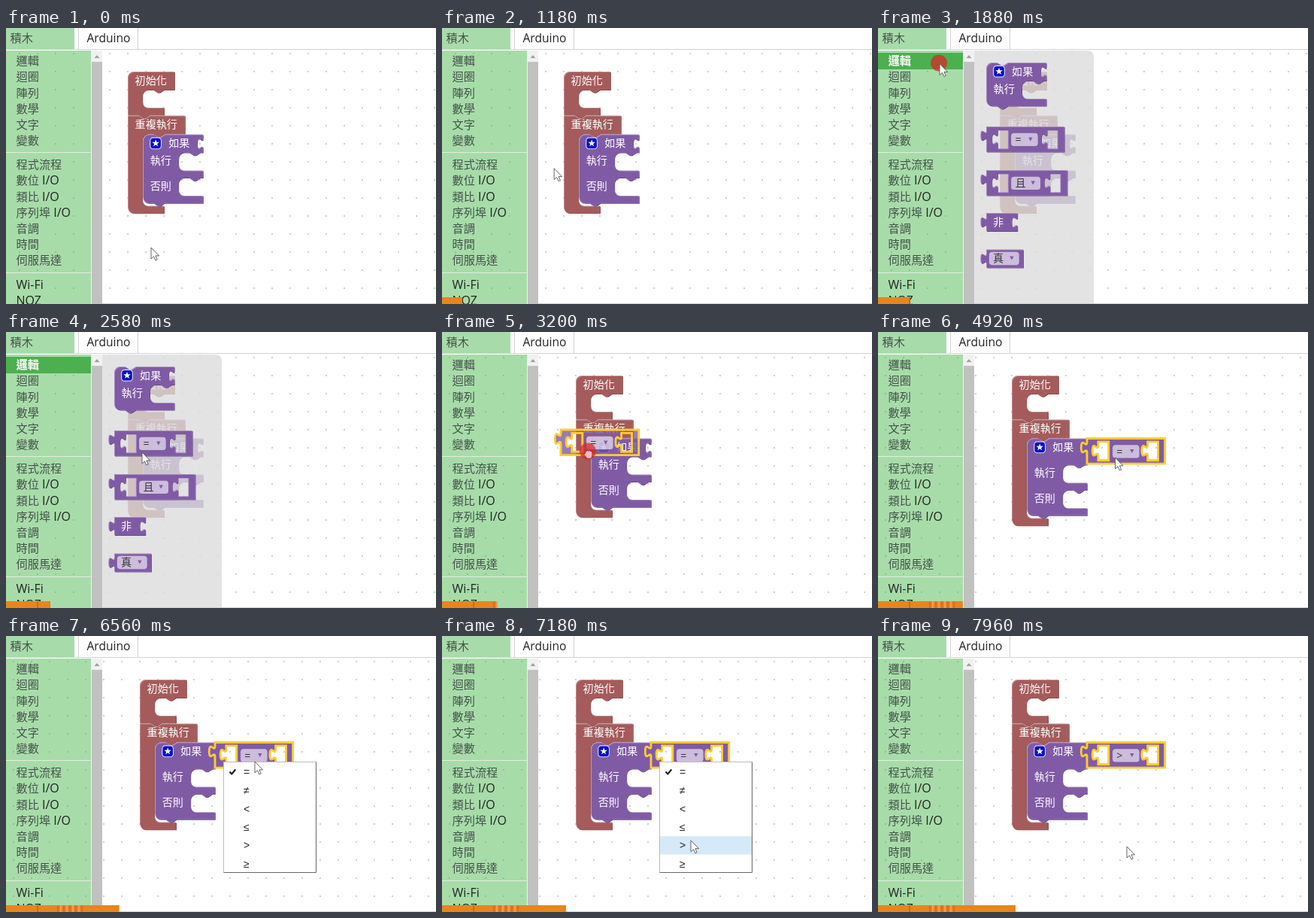
Write an HTML page that moves like this. It is 572x367 px and loops after 8 s.

```html
<!DOCTYPE html>
<html lang="zh-Hant">
<head>
<meta charset="utf-8">
<title>Blocks</title>
<style>
html, body { margin: 0; width: 100%; height: 100%; overflow: hidden; background: #fff; }
svg { display: block; }
text { font-family: "Open Sans", "Noto Sans CJK TC", "Noto Sans CJK JP", sans-serif; white-space: pre; }
.menu text { font: 14px "Liberation Sans", sans-serif; fill: #222; }
</style>
</head>
<body>
<script>
const NS = 'http://www.w3.org/2000/svg';
const LOOP = 8000, STEP = 78, SCALE = 0.96;
const RED = { face: '#a55b5b', dark: '#844949', light: '#c08c8c' };
const PURPLE = { face: '#805ba5', dark: '#664984', light: '#a68cc0' };
const GOLD = '#fc3', INK = '#222', SOFT = '#44524a';

function el(tag, attrs, parent) {
  const node = document.createElementNS(NS, tag);
  for (const k in attrs) node.setAttribute(k, attrs[k]);
  if (parent) parent.appendChild(node);
  return node;
}
const set = (node, attrs) => { for (const k in attrs) node.setAttribute(k, attrs[k]); };
const show = (node, on) => node.setAttribute('visibility', on ? 'inherit' : 'hidden');
const rect = (parent, x, y, width, height, fill, more) =>
  el('rect', { x, y, width, height, fill, ...more }, parent);
const group = (parent, attrs) => el('g', attrs || {}, parent);
function text(parent, x, y, str, size, fill, more) {
  const t = el('text', { x, y, 'font-size': size, fill, ...more }, parent);
  t.textContent = str;
  return t;
}
const at = (x, y) => `translate(${x} ${y})`;
const scaled = (x, y) => `${at(x, y)} scale(${SCALE})`;

// Block outlines, in block units
const NOTCH = 'l6,4 3,0 6,-4';
const TAB = 'l-6,4 -3,0 -6,-4';
const SOCKET = 'v5 c0,10 -8,-8 -8,7.5 s8,-2.5 8,7.5';
const PLUG = 'V20 c0,-10 -8,8 -8,-7.5 s8,2.5 8,-7.5 z';
const ROUND_TOP = 'M0,8 A8,8 0 0 1 8,0';
const ROUND_END = 'H8 a8,8 0 0 1 -8,-8 z';
const cave = (x, y, h, w) =>
  `V${y} H${x + 30} ${TAB} h-7 a8,8 0 0 0 -8,8 v${h - 16} a8,8 0 0 0 8,8 H${w}`;
const hole = x => `M${x},4.5 ${SOCKET} v6 h14.5 v-26 z`;
const pairPath = w => `M0,0 H${w} v35 H0 ${PLUG} ${hole(15.5)} ${hole(w - 24)}`;
const ifPath = (row, withElse) =>
  `${ROUND_TOP} H15 ${NOTCH} H83 ${SOCKET} ${cave(49, row, 25, 83)}` +
  (withElse ? cave(49, row + 35, 25, 83) : '') + `v10 H29.5 ${TAB} ${ROUND_END}`;

let clips = 0;
function block(parent, x, y, tone, d) {
  const g = group(parent, { transform: at(x, y), 'fill-rule': 'evenodd' });
  const id = 'clip' + clips++;
  el('path', { d, 'clip-rule': 'evenodd' }, el('clipPath', { id }, g));
  el('path', { d, fill: tone.dark, transform: at(1, 1) }, g);
  el('path', { d, fill: tone.light }, g);
  el('path', { d, fill: tone.face, transform: at(1, 1) }, group(g, { 'clip-path': `url(#${id})` }));
  return g;
}
const label = (parent, x, y, str) => text(parent, x, y + 17.3, str, 14.67, '#fff');

function dropdown(parent, x, y, w, str) {
  const box = rect(parent, x, y, w, 18, '#fff', { rx: 4, 'fill-opacity': 0.6 });
  const value = text(parent, x + 5.5, y + 14, str, 14.67, '#333');
  el('path', { d: `M${x + w - 13},${y + 6} h5.6 l-2.8,5 z`, fill: PURPLE.face }, parent);
  return { box, value };
}

function star(parent) {
  const g = group(parent, { transform: at(17.7, 12.3) });
  rect(g, -7.7, -7.7, 15.4, 15.4, '#0b12c4', { rx: 4, stroke: '#d5d5f2', 'stroke-width': 1.2 });
  let pts = '';
  for (let i = 0; i < 10; i++) {
    const a = i * Math.PI / 5, r = i % 2 ? 2.1 : 5.2;
    pts += `${r * Math.sin(a)},${-r * Math.cos(a)} `;
  }
  el('polygon', { points: pts, fill: '#fff' }, g);
}

function ifBlock(parent, x, y, row, withElse) {
  const g = block(parent, x, y, PURPLE, ifPath(row, withElse));
  star(g);
  label(g, 35.5, 0, '如果');
  label(g, 10, row - 1, '執行');
  if (withElse) label(g, 10, row + 34, '否則');
}

function program(parent, row) {
  const g = group(parent);
  label(block(g, 0, 0, RED, `${ROUND_TOP} H64.5 ${cave(20, 25, 25, 50)} v10 H29.5 ${TAB} H0 z`), 10, 0, '初始化');
  label(block(g, 0, 61, RED, `M0,0 H15 ${NOTCH} H79 ${cave(20, 25, row + 75, 50)} v10 ${ROUND_END}`), 10, 0, '重複執行');
  ifBlock(g, 21, 87, row, true);
  return g;
}

const svg = el('svg', { viewBox: '0 0 572 367', width: '100%', height: '100%' }, document.body);
rect(svg, 0, 0, 572, 367, '#fff');

// Workspace
const pattern = el('pattern', { id: 'dots', width: 24, height: 24, patternUnits: 'userSpaceOnUse' }, el('defs', {}, svg));
rect(pattern, 0, 0, 2, 2, '#cfcfcf');
rect(svg, 0, 30, 572, 337, 'url(#dots)');
const work = group(svg);
const before = program(work, 25);
const after = program(work, 36.5);

// Flyout
const flyout = group(svg);
el('path', { d: 'M128,30 H279 a8,8 0 0 1 8,8 V367 H128 z', fill: '#ddd', 'fill-opacity': 0.8 }, flyout);
const shelf = y => group(flyout, { transform: scaled(144, y) });
ifBlock(shelf(46), 0, 0, 25, false);
dropdown(block(shelf(131), 0, 0, PURPLE, pairPath(108)), 34.5, 9.2, 37, '=');
dropdown(block(shelf(189), 0, 0, PURPLE, pairPath(112)), 34.5, 9.2, 40.5, '且');
label(block(shelf(246), 0, 0, PURPLE, `M0,0 H43 ${SOCKET} V25 H0 ${PLUG}`), 9.5, 0, '非');
dropdown(block(shelf(294.5), 0, 0, PURPLE, `M0,0 H51 V25 H0 ${PLUG}`), 4, 3.5, 41.5, '真');

// Header
rect(svg, 0, 0, 572, 30, '#fff');
rect(svg, 0, 28, 572, 1, '#d4d4d4');
rect(svg, 0, 0, 91, 28, '#a7dcaa');
rect(svg, 96, 0, 1, 28, '#d0d0d0');
rect(svg, 175, 0, 1, 28, '#d0d0d0');
text(svg, 5.5, 19.1, '積木', 15.2, SOFT);
text(svg, 107.5, 19, 'Arduino', 15.6, INK);
rect(svg, 113, 366, 459, 1, '#cfcfcf');

// Toolbox
rect(svg, 0, 30, 113, 337, '#50b955', { 'fill-opacity': 0.5 });
function row(y, str) {
  const [name, ...latin] = str.split(' ');
  const t = text(svg, 13.5, y + 5.2, name, 15.2, SOFT);
  if (latin.length) el('tspan', { fill: INK, 'font-size': 16 }, t).textContent = ' ' + latin[0];
}
['邏輯', '迴圈', '陣列', '數學', '文字', '變數'].forEach((s, i) => row(44 + i * 21.2, s));
['程式流程', '數位 I/O', '類比 I/O', '序列埠 I/O', '音調', '時間', '伺服馬達'].forEach((s, i) => row(182 + i * 21.15, s));
text(svg, 13.5, 346.7, 'Wi-Fi', 16, INK);
text(svg, 13.5, 367.5, 'NQZ', 16, INK);
for (const y of [165, 325]) rect(svg, 0, y, 113, 1, '#e3ece3');
const picked = group(svg);
rect(picked, 0, 33, 113, 22, '#4caf50');
text(picked, 13.5, 49.2, '邏輯', 15.2, '#fff', { 'font-weight': 700 });
rect(svg, 113, 30, 15, 337, '#f1f1f1');
rect(svg, 114, 45, 14, 322, '#c1c1c1');
el('path', { d: 'M117.5,40 h7 l-3.5,-4 z', fill: '#a0a0a0' }, svg);

// Comparison block in hand
const target = el('path', {
  d: `M0,0 ${SOCKET} v5`, transform: scaled(277.9, 141.5), fill: 'none', stroke: GOLD, 'stroke-width': 4
}, svg);
const held = group(svg);
const heldPath = el('path', {
  d: pairPath(108), fill: PURPLE.face, 'fill-rule': 'evenodd', stroke: GOLD, 'stroke-width': 3
}, held);
const heldField = dropdown(held, 35.5, 9.2, 37, '=');
const ripple = el('circle', { cx: 281, cy: 154, fill: 'none', stroke: '#888', 'stroke-width': 9.6 }, svg);

// Operator menu
const menu = group(svg, { class: 'menu' });
rect(menu, 289, 167, 124, 148, '#fff');
el('path', { d: 'M289.5,314.5 V167.5 H412.5', fill: 'none', stroke: '#bbb' }, menu);
el('path', { d: 'M412.5,167.5 V314.5 H289.5', fill: 'none', stroke: '#666' }, menu);
const ROW_H = 24.3;
const hover = rect(menu, 290, 169, 122, ROW_H, '#d6e9f8');
['=', '≠', '<', '≤', '>', '≥'].forEach((s, i) => text(menu, 316, 186 + i * ROW_H, s));
el('path', { d: 'M297.5,180.5 l2.8,3 5,-6', fill: 'none', stroke: '#111', 'stroke-width': 2 }, menu);

// Progress bar
const bar = el('svg', { x: 0, y: 358, height: 9, overflow: 'hidden' }, svg);
rect(bar, 0, 0, 572, 9, '#e8851c');
rect(bar, 41.5, 0, 1.2, 9, '#a8621c');
for (let i = 0; i < 9; i++) rect(bar, 68 + i * 4, 0, 2, 9, i % 2 ? '#f2a050' : '#ea6326');

// Pointer
const press = el('circle', { r: 11, fill: '#d62828', 'fill-opacity': 0.74 }, svg);
const arrow = el('path', {
  d: 'M0,0 V15 L3.5,11.8 L5.9,17 L8.2,16 L5.9,10.9 H10.6 Z',
  fill: '#fff', stroke: '#555', 'stroke-width': 0.9, 'stroke-linejoin': 'round'
}, svg);
const hand = el('path', {
  d: 'M-3.5,2 q0,-3.5 2,-3 q1.2,-1.6 2.6,-.4 q1.6,-1 2.6,.5 q2.4,-.4 2.4,2.6 q.2,4 -1.8,7 h-5.5 q-1.2,-3 -3.8,-4.2 q-.6,-2.4 1.5,-2.5 z',
  fill: '#f0bcbc', stroke: '#a02a2a', 'stroke-width': 0.9
}, svg);

const PATH = [
  [0, 192, 291], [400, 192, 291], [860, 184, 260], [1640, 81, 46.5], [2050, 81, 46.5],
  [2560, 180, 159], [2730, 180, 159], [3200, 194, 158.5], [3440, 200, 159],
  [4050, 305.5, 182], [4270, 316, 168], [4440, 316, 168], [4700, 314.5, 166], [5300, 314.5, 166],
  [5700, 332, 160], [6050, 330, 166], [6560, 330, 166], [6900, 330, 243], [7300, 330, 279], [LOOP, 330, 279]
];
function pointer(t) {
  let i = 1;
  while (t > PATH[i][0]) i++;
  const [t0, x0, y0] = PATH[i - 1], [t1, x1, y1] = PATH[i];
  const p = (t - t0) / (t1 - t0), e = p * p * (3 - 2 * p);
  return [x0 + (x1 - x0) * e, y0 + (y1 - y0) * e];
}

const GRAB = 2730, DRAG = 2800, DROP = 4440, MENU = 6230, PICK = 7790;
const PRESSES = [[1710, 2020], [GRAB - 40, DROP], [6160, 6400], [7640, PICK]];
const within = (t, a, b) => t >= a && t < b;

function render(ms) {
  const t = Math.floor((ms + 10) / STEP) * STEP;
  const [x, y] = pointer(t);
  const dragging = within(t, DRAG, DROP), dropped = t >= DROP;

  const shift = t >= DRAG ? 178 : 162;
  set(work, { transform: scaled(shift, 58) });
  set(pattern, { x: shift % 24 - 1, y: 57 % 24 });
  show(before, !dropped);
  show(after, dropped);
  show(flyout, within(t, 1790, DRAG));
  show(picked, within(t, 1600, DRAG));

  const bx = dropped ? 278 : x - 36, by = dropped ? 141.5 : y - 28.5;
  show(held, t >= DRAG);
  set(held, { transform: scaled(bx, by) });
  set(heldPath, { 'fill-opacity': dragging ? 0.8 : 1 });
  show(target, dragging && Math.hypot(bx - 278, by - 141.5) < 25);
  const over = dropped && x > 318 && y < 165;
  set(heldField.box, { 'fill-opacity': over ? 0.8 : 0.6 });
  heldField.value.textContent = t >= PICK ? '>' : '=';

  const p = (t - DROP) / 150;
  show(ripple, p > 0 && p < 1);
  set(ripple, { r: Math.max(0, p * 24), opacity: 1 - p });

  const item = Math.floor((y + 1 - 169) / ROW_H);
  show(menu, within(t, MENU, PICK));
  show(hover, within(t, MENU, PICK) && item >= 0);
  set(hover, { y: 169 + Math.max(0, item) * ROW_H });

  set(bar, { width: t * 0.023 });

  const grabbing = within(t, GRAB, DROP);
  show(press, PRESSES.some(([a, b]) => within(t, a, b)));
  set(press, { cx: x, cy: y });
  show(arrow, !grabbing);
  show(hand, grabbing);
  set(arrow, { transform: at(x + 1, y + 1) });
  set(hand, { transform: at(x, y + 1) });
}

const start = performance.now();
function tick() {
  render((performance.now() - start) % LOOP);
  requestAnimationFrame(tick);
}
tick();
</script>
</body>
</html>
```
